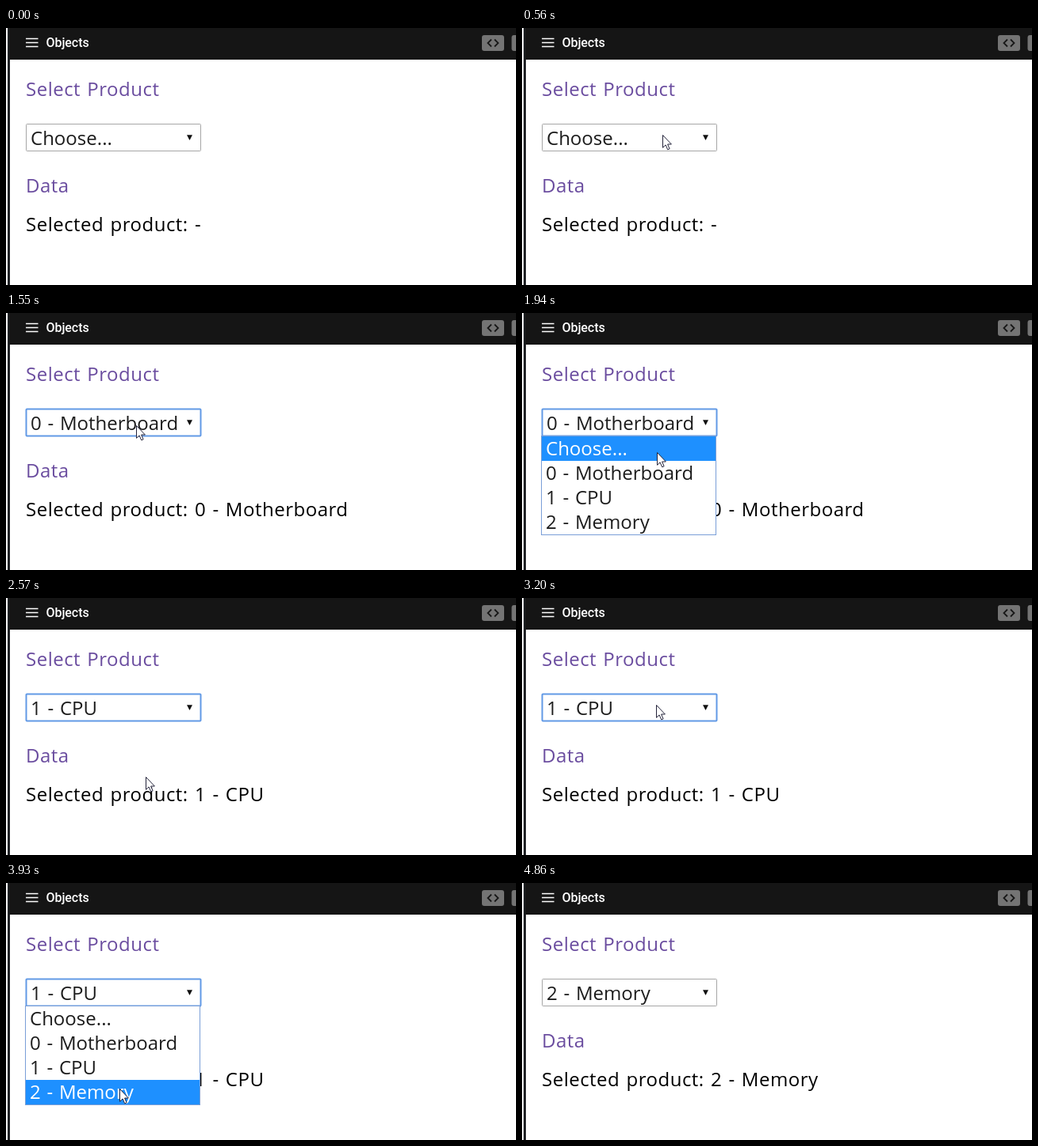
Animation, 643 px wide and 325 px high, one loop 4930 ms. Source, as an HTML page:

```html
<!DOCTYPE html>
<html lang="en">
<head>
<meta charset="utf-8">
<title>Select Product</title>
<style>
  html, body { margin: 0; width: 100%; height: 100%; overflow: hidden; background: #fff; }
  svg { display: block; }
  text { font: 24px "Open Sans", "Noto Sans", sans-serif; word-spacing: 1.5px; }
  .page { letter-spacing: .5px; }
  .heading { fill: #6a4c9f; }
  .field { fill: #1c1c1c; }
  .brand { font: 500 16px Roboto, sans-serif; letter-spacing: -.08px; fill: #fff; }
  #box { fill: #fff; stroke: #a6a6a6; }
  #box.focused { stroke: #629ae6; stroke-width: 2px; }
</style>
</head>
<body>
<svg width="643" height="325" viewBox="0 0 643 325">
  <path d="M2 0H5V325H2Z" fill="#202225"/>
  <path d="M4 0H643V40H4Z" fill="#151515"/>
  <path d="M25 13.5H40.5M25 18.5H40.5M25 23.5H40.5" stroke="#fff" stroke-width="1.3"/>
  <text class="brand" x="50.5" y="24">Objects</text>
  <g fill="#747474">
    <rect x="600" y="9" width="28" height="20" rx="3"/>
    <rect x="637.5" y="9" width="28" height="20" rx="3"/>
  </g>
  <path d="M612 14.5L607.5 19L612 23.5M616 14.5L620.5 19L616 23.5" fill="none" stroke="#181818" stroke-width="1.8"/>

  <text class="page heading" x="25" y="86">Select Product</text>
  <text class="page heading" x="25" y="208">Data</text>
  <text class="page" id="result" x="25" y="257"></text>

  <rect id="box" x="25.5" y="121.5" width="220" height="34" rx="1"/>
  <text class="field" id="value" x="31" y="148"></text>
  <path d="M228 135.2H235L231.5 142Z" fill="#111"/>

  <g id="menu">
    <rect x="24.5" y="155.5" width="220" height="125" fill="#fff" stroke="#7a9fd8"/>
    <rect id="mark" x="25" width="219" height="31" fill="#1e90ff"/>
  </g>
  <path id="cursor" d="M.5 .5V16.3L4.1 12.9L6.7 18.8L9.1 17.8L6.6 12H11.4Z" fill="#fff" stroke="#23233a"/>
</svg>
<script>
const LOOP = 4930, TICK = 70, ROW = 31, MENU_TOP = 156;
const ENTER = 140, LEAVE = 4750;
const options = ["Choose...", "0 - Motherboard", "1 - CPU", "2 - Memory"];

// Each move glides from the previous stop to (x, y)
const moves = [
  { at: ENTER, ticks: 8, x: 170, y: 137 },
  { at: 760, ticks: 6, x: 153, y: 201 },
  { at: 1270, ticks: 7, x: 165, y: 137 },
  { at: 1870, ticks: 8, x: 176, y: 226 },
  { at: 2640, ticks: 5, x: 383, y: 236 },
  { at: 2990, ticks: 5, x: 160, y: 131 },
  { at: 3440, ticks: 8, x: 143, y: 260 },
  { at: 4050, ticks: 8, x: 572, y: 46 },
  { at: 4610, ticks: 3, x: 562, y: -22 }
];

// Menu visits; closing one picks the next option
const visits = [{ open: 630, close: 1270 }, { open: 1710, close: 2430 }, { open: 3290, close: 4050 }];

const $ = id => document.getElementById(id);
const show = (id, on) => $(id).style.display = on ? "" : "none";
const clamp = (v, lo, hi) => Math.min(hi, Math.max(lo, v));
const easeOut = u => 1 - (1 - u) ** 2;

const labels = options.map((name, i) => {
  const label = $("value").cloneNode();
  label.removeAttribute("id");
  label.setAttribute("x", 30);
  label.setAttribute("y", 180 + ROW * i);
  label.textContent = name;
  $("menu").append(label);
  return label;
});

function pointer(t) {
  let x = 600, y = -20;
  for (const m of moves) {
    const tick = clamp(Math.floor((t - m.at) / TICK) + 1, 0, m.ticks);
    const u = easeOut(tick / m.ticks);
    x += (m.x - x) * u;
    y += (m.y - y) * u;
  }
  return { x: Math.round(x), y: Math.round(y) };
}

function draw(t) {
  const { x, y } = pointer(t);
  $("cursor").setAttribute("transform", `translate(${x} ${y})`);
  show("cursor", t >= ENTER && t < LEAVE);

  const picked = visits.filter(v => t >= v.close).length;
  $("value").textContent = options[picked];
  $("result").textContent = "Selected product: " + (picked ? options[picked] : "-");
  $("box").classList.toggle("focused", t >= visits[0].open && t < LEAVE);
  show("menu", visits.some(v => t >= v.open && t < v.close));

  // The highlight trails the pointer by one tick
  const row = clamp(Math.floor((pointer(t - TICK).y - MENU_TOP) / ROW), 0, options.length - 1);
  $("mark").setAttribute("y", MENU_TOP + ROW * row);
  labels.forEach((label, i) => label.style.fill = i === row ? "#fff" : "");
}

const begin = performance.now();
function frame() {
  draw((performance.now() - begin) % LOOP);
  requestAnimationFrame(frame);
}
frame();
</script>
</body>
</html>
```
